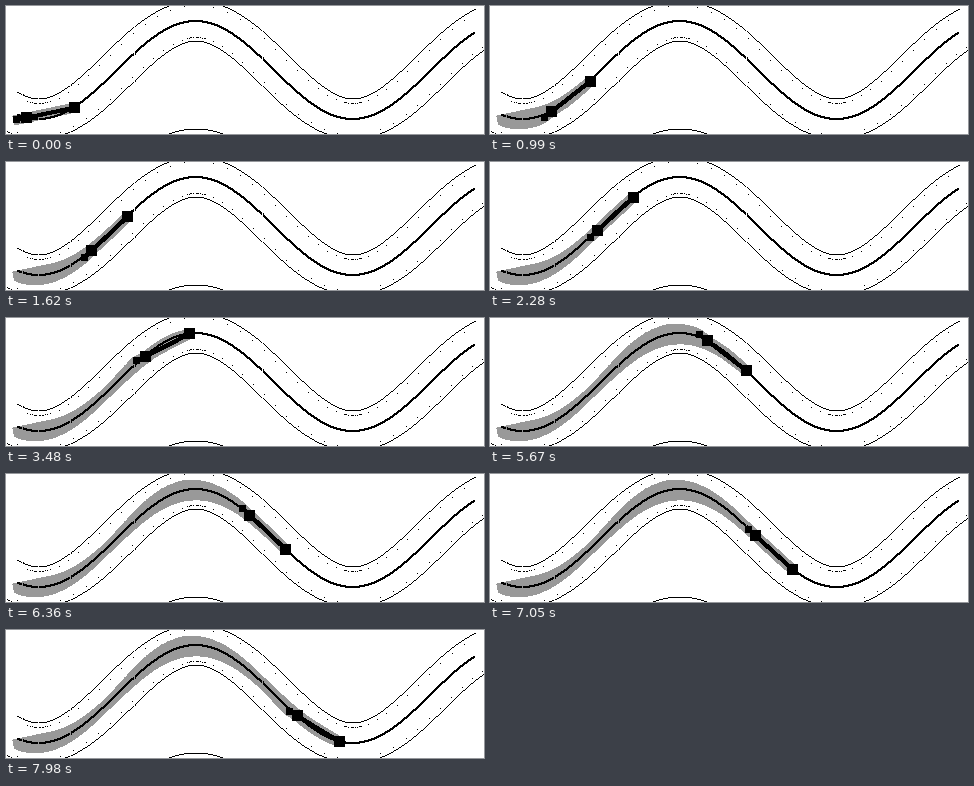
A matplotlib script for the animation above (8000 ms loop, 478 px wide and 128 px high).

```python
import numpy as np
import matplotlib.pyplot as plt
from matplotlib.animation import FuncAnimation
from matplotlib.collections import LineCollection
from matplotlib.patches import Rectangle

W, H, DPI = 478, 128, 100
PX = 72 / DPI                      # points per pixel
CREST, MID, AMP, SCALE = 189.5, 64, 49, 50
WHEELBASE, OVERHANG = 49.5, 9.5
STEP_MS, TICK, STEPS = 30, 20, 266

plt.rcParams["path.simplify"] = False


def track(x):
    return MID - AMP * np.cos((x - CREST) / SCALE)


def offset(x, d):
    """Curve parallel to the track; positive d lies below it."""
    slope = AMP / SCALE * np.sin((x - CREST) / SCALE)
    n = np.hypot(1, slope)
    return x - d * slope / n, track(x) + d / n


def rear_axle(x):
    """Point on the track one wheelbase behind x, found by bisection."""
    lo, hi = x - WHEELBASE, x.copy()
    for _ in range(40):
        m = (lo + hi) / 2
        far = np.hypot(x - m, track(x) - track(m)) > WHEELBASE
        lo, hi = np.where(far, m, lo), np.where(far, hi, m)
    return (lo + hi) / 2


fx = 68.0 + np.arange(STEPS)
front = np.column_stack([fx, track(fx)])
rx = rear_axle(fx)
rear = np.column_stack([rx, track(rx)])
heading = (front - rear) / WHEELBASE
tail = rear - OVERHANG * heading
sweep = np.stack([tail - 3 * heading, front], axis=1)

fig = plt.figure(figsize=(W / DPI, H / DPI), dpi=DPI, facecolor="white")
ax = fig.add_axes([0, 0, 1, 1])
ax.set_xlim(-0.5, W - 0.5)
ax.set_ylim(H - 0.5, -0.5)
ax.axis("off")


def pixels(x, y, z=2):
    ax.plot(np.round(x), np.round(y), ls="none", marker=",", color="black",
            zorder=z)


def limit(d, first, last, shift=0):
    """One-pixel parallel curve, one pixel per column."""
    cols = np.arange(first, last + 1)
    x, y = offset(np.linspace(-30, 510, 2000), d)
    pixels(cols, np.interp(cols, x, y) + shift)


# Clearance limits; the upper one wraps round to the bottom edge
limit(-20.5, 11, 469)
limit(-20.5, 11, 469, H)
limit(19.5, 0, W - 1)

# Sparse dots along the limits, denser inside the bends
for side in (-16, 16):
    pixels(*offset(np.arange(16, 468, 11.0), side))
bend = np.arange(-12, 13, 3.0)
half = np.pi * SCALE
for centre, side in ((CREST - half, -16), (CREST, 16), (CREST + half, -16)):
    pixels(*offset(centre + bend, side))

# Track drawn with a pen two pixels square
cols = np.arange(12, 469)
for dx in (0, 1):
    for dy in (0, 1):
        pixels(cols - dx, np.round(track(cols)) - dy, 3)

swept = LineCollection([], colors="#999999", linewidths=9 * PX,
                       antialiaseds=False, capstyle="butt", zorder=1)
ax.add_collection(swept)
body = ax.plot([], [], color="black", lw=3 * PX, antialiased=False,
               solid_capstyle="butt", zorder=4)[0]


def block(size):
    r = Rectangle((0, 0), size, size, fc="black", ec="none",
                  antialiased=False, zorder=5)
    return ax.add_patch(r)


blocks = [(block(11), front), (block(11), rear), (block(7), tail)]


def update(i):
    t = i * TICK + TICK / 2
    n = min(max(int((t - 30) // STEP_MS), 0), STEPS - 1)
    swept.set_segments(sweep[:n + 1])
    body.set_data(*np.array([tail[n], front[n]]).T)
    for rect, pts in blocks:
        rect.set_xy(np.round(pts[n]) - rect.get_width() / 2)
    return [swept, body] + [b[0] for b in blocks]


anim = FuncAnimation(fig, update, frames=8000 // TICK, interval=TICK,
                     repeat=True, repeat_delay=0)
plt.show()
```
